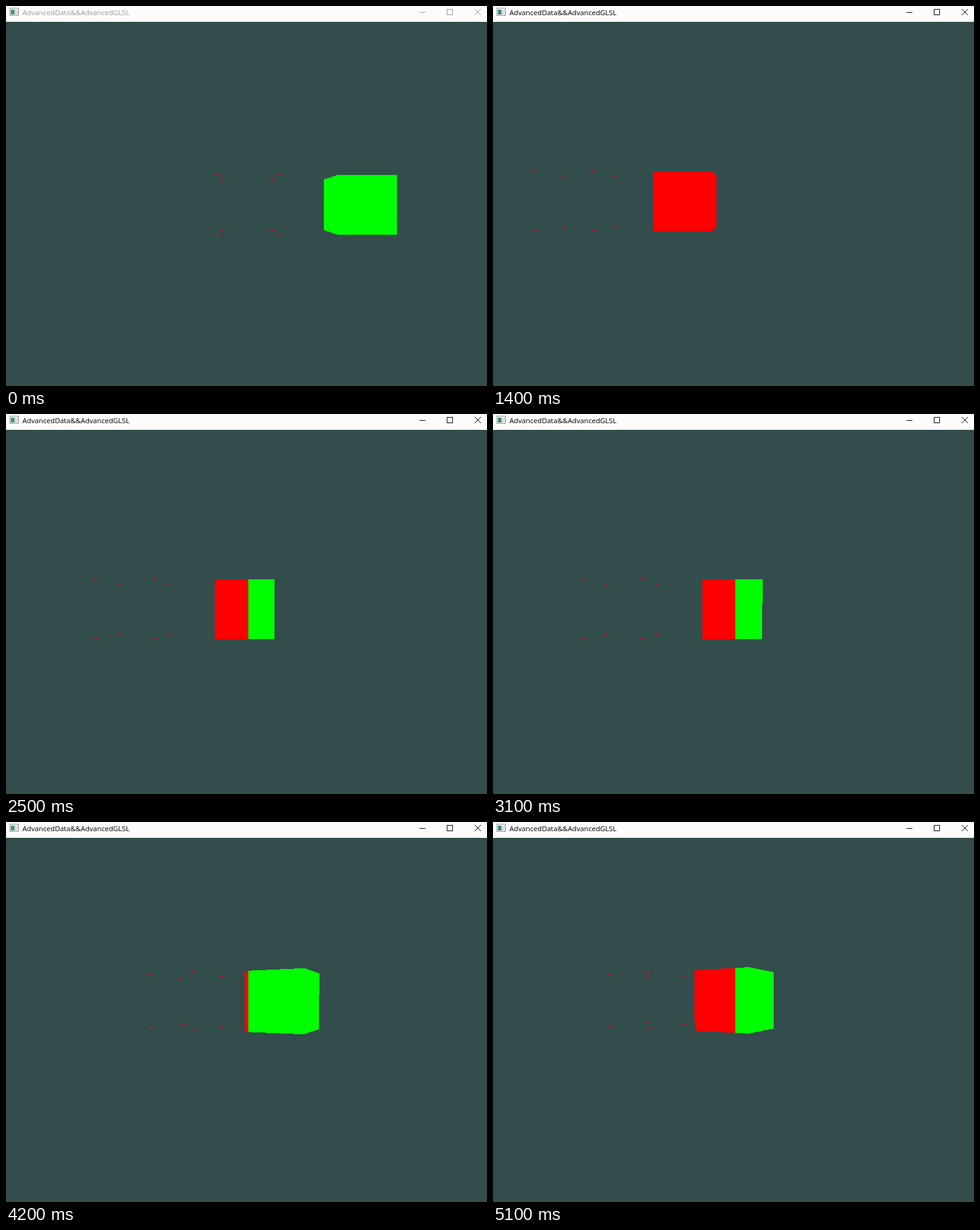
Animation, 790 px wide and 623 px high, one loop 6 s. Source, as an HTML page:

```html
<!DOCTYPE html>
<html lang="en">
<head>
<meta charset="utf-8">
<title>AdvancedData&amp;&amp;AdvancedGLSL</title>
<style>
  html, body { margin: 0; width: 100%; height: 100%; overflow: hidden; background: #334c4c; }
  svg { display: block; }
  .title { font: 11.65px "Open Sans", "Noto Sans", sans-serif; }
  #bar { fill: #999; stroke: #999; }
  #bar.active { fill: #000; stroke: #000; }
  #bar text { stroke: none; }
  #bar path { fill: none; }
</style>
</head>
<body>
<svg width="790" height="623" viewBox="0 0 790 623">
  <defs>
    <linearGradient id="split" gradientUnits="userSpaceOnUse" x1="0" y1="0" x2="796" y2="0">
      <stop offset=".5" stop-color="#f00"/>
      <stop offset=".5" stop-color="#0f0"/>
    </linearGradient>
  </defs>
  <rect width="790" height="623" fill="#334c4c"/>
  <g id="scene" shape-rendering="crispEdges"></g>
  <rect width="790" height="26" fill="#fcfcfa"/>
  <g shape-rendering="crispEdges">
    <rect x="6.5" y="3.5" width="14" height="12" fill="#f4f6f6" stroke="#8b9496"/>
    <rect x="8" y="6" width="6" height="8" fill="#4b8a80"/>
    <rect x="15" y="6" width="2" height="8" fill="#c3cfd2"/>
    <rect x="18" y="6" width="2" height="8" fill="#d5dcde"/>
  </g>
  <g id="bar">
    <text class="title" x="27" y="15">AdvancedData&amp;&amp;AdvancedGLSL</text>
    <path shape-rendering="crispEdges" d="M679 10.5h10M724.5 5.5h9v9h-9z"/>
    <path d="M770 5l10 10M780 5l-10 10"/>
  </g>
</svg>
<script>
const LOOP = 6000, STEP = 100, FOCUS_TIME = 400;
const FOCAL = 543.2, CENTER_X = 398, CENTER_Y = 326;
const DOT = 3, DOTS_OFFSET = -2;

// side and depth: solid cube as seen from the camera; yaw in degrees; lift: horizon shift in pixels
const startPose = { side: 1.99, depth: 6.04, yaw: 0, lift: 0 };
const move = (from, to, pose) => ({ from, to, pose });
const strafe = (from, to, side) => move(from, to, { side });
const moves = [
  move(400, 500, { side: 2.05, lift: 6 }),
  strafe(817, 1400, -.878),
  strafe(1500, 1800, .29),
  strafe(1800, 2000, -.2),
  strafe(2127, 2300, .375),
  strafe(2300, 2500, -.06),
  strafe(2700, 2900, -.454),
  strafe(3000, 3100, -.046),
  strafe(3200, 3400, -.454),
  move(3600, 4000, { side: 1.6, depth: 5.69, yaw: 24.9, lift: 31.7 }),
  strafe(4027, 4300, .03),
  move(4300, 4400, { yaw: 28.6, lift: 33.2 }),
  strafe(4300, 4700, -.67),
  strafe(4900, 5100, .005)
];

// Corner n has its x, y and z in bits 0, 1 and 2.
const corners = Array.from({ length: 8 }, (_, n) => [0, 1, 2].map(axis => (n >> axis & 1) - .5));
const faces = Array.from({ length: 6 }, (_, n) => {
  const axis = n >> 1, base = (n & 1) << axis;
  const u = 1 << (axis + 1) % 3, v = 1 << (axis + 2) % 3;
  return [base, base + u, base + u + v, base + v];
});

const bar = document.getElementById('bar');
const scene = document.getElementById('scene');

function add(tag, attributes) {
  const node = document.createElementNS('http://www.w3.org/2000/svg', tag);
  for (const name in attributes) node.setAttribute(name, attributes[name]);
  return scene.appendChild(node);
}
const quads = faces.map(() => add('polygon', { fill: 'url(#split)' }));
const dots = corners.map(() => add('rect', { width: DOT, height: DOT, fill: '#f00' }));

function poseAt(time) {
  const pose = { ...startPose };
  for (const { from, to, pose: goal } of moves) {
    const k = Math.min(1, Math.max(0, (time - from) / (to - from)));
    for (const key in goal) pose[key] += (goal[key] - pose[key]) * k;
  }
  return pose;
}

function camera({ side, depth, yaw, lift }) {
  const angle = yaw * Math.PI / 180, pitch = Math.atan(lift / FOCAL);
  const c = Math.cos(angle), s = Math.sin(angle);
  const cp = Math.cos(pitch), sp = Math.sin(pitch);
  return ([x, y, z]) => {
    const right = side + c * x + s * z;
    const ahead = depth - s * x + c * z;
    const scale = FOCAL / (ahead * cp - y * sp);
    return [CENTER_X + right * scale, CENTER_Y - (y * cp + ahead * sp) * scale];
  };
}

function draw(time) {
  const project = camera(poseAt(time));
  const solid = corners.map(project);
  quads.forEach((quad, i) =>
    quad.setAttribute('points', faces[i].map(n => solid[n].map(v => v.toFixed(2))).join(' ')));
  dots.forEach((dot, i) => {
    const [x, y, z] = corners[i];
    const [left, top] = project([x + DOTS_OFFSET, y, z]).map(v => Math.round(v - DOT / 2));
    dot.setAttribute('x', left);
    dot.setAttribute('y', top);
  });
  bar.classList.toggle('active', time >= FOCUS_TIME);
}

const start = performance.now();
function tick() {
  const time = (performance.now() - start) % LOOP;
  draw(Math.floor(time / STEP) * STEP);
  requestAnimationFrame(tick);
}
tick();
</script>
</body>
</html>
```
